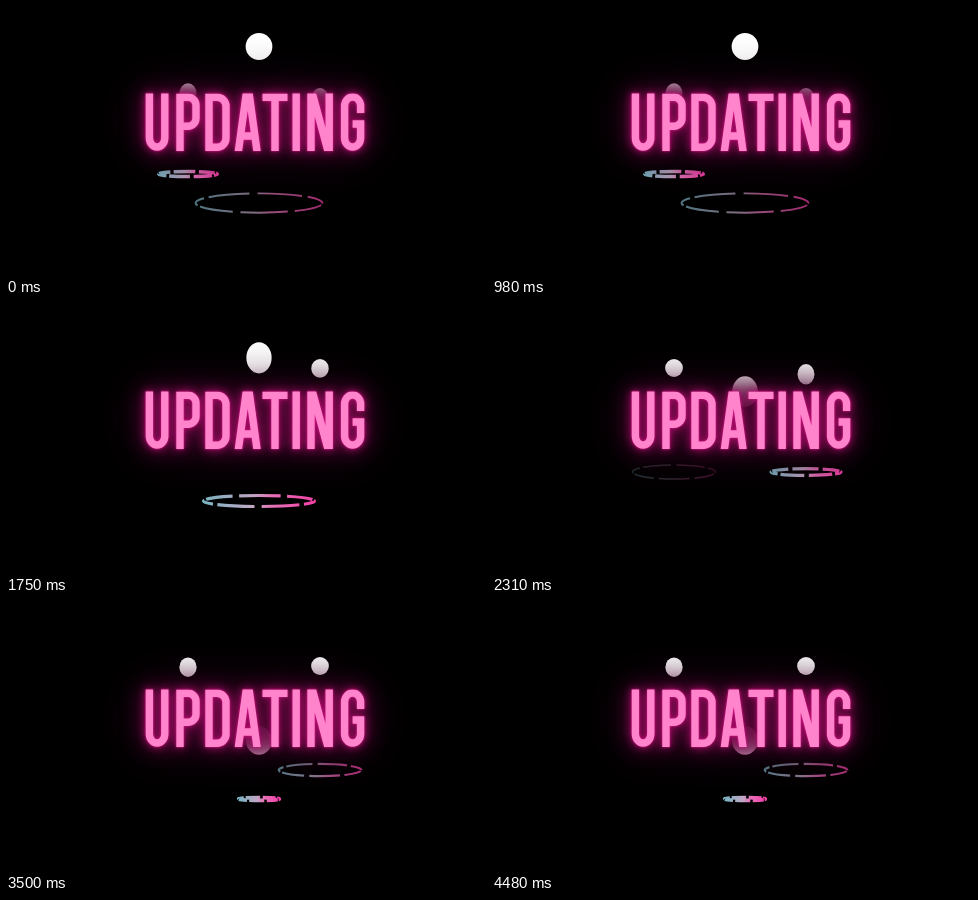
These frames come from a looping animation (480x270 px, 4.55 s). An HTML page with a canvas:

```html
<!DOCTYPE html>
<html lang="en">
<head>
<meta charset="utf-8">
<title>Updating</title>
<style>
  html, body { margin: 0; width: 100%; height: 100%; overflow: hidden; background: #000; }
  svg, canvas { position: absolute; left: 0; top: 0; width: 480px; height: 270px; }
  .glow {
    filter: drop-shadow(0 0 1px #e0148c) drop-shadow(0 0 4px #a80c68)
      drop-shadow(0 0 10px #5c0639) drop-shadow(0 0 22px #26031a);
  }
  .letters { fill: none; stroke: #ff84cc; stroke-width: 7.4; clip-path: url(#line); }
</style>
</head>
<body>
<canvas id="stage" width="480" height="270"></canvas>
<svg viewBox="0 0 480 270" role="img" aria-label="UPDATING">
  <clipPath id="line"><path d="M130 87.5H370V145H130z"/></clipPath>
  <g class="glow"><g class="letters">
    <path d="M143.4 87V132a7.7 9 0 0 0 15.4 0V87"/>
    <path d="M174 146V91.2h8a8 8 0 0 1 8 8v13a8 8 0 0 1-8 8h-8"/>
    <path d="M203 91.2V141.3h8a9 9 0 0 0 9-9V100.2a9 9 0 0 0-9-9z"/>
    <path d="M232 148L240.8 84M251.4 148L242.6 84M236 130h12"/>
    <path d="M256.5 91.2h25M269 91V146"/>
    <path d="M290.2 87V146"/>
    <path d="M305 146V87M323.2 146V87M305.4 84L322.8 148"/>
    <path d="M354.6 107V100a8 9 0 0 0-16 0V132a8 9 0 0 0 16 0V118h-8"/>
  </g></g>
</svg>
<script>
const LOOP = 4550, STEP = 70, BOUNCE = 980, RIPPLE = 560;
const ctx = document.getElementById('stage').getContext('2d');

// land: when the ball touches the floor; rise, fall: steepness of each half
const small = { r: 8.9, top: 64, drop: 96, rise: 3.8, fall: 5.5, floor: 168, ringW: 42.5, ringH: 7.3 };
const balls = [
  { ...small, x: 182, land: 828, ripple: 790 },
  { ...small, x: 314, land: 98, ripple: 90 },
  { x: 253, r: 13.4, top: 40.5, drop: 143, rise: 3, fall: 3, floor: 197, ringW: 64.5, ringH: 11,
    land: 502, ripple: 490 }
];

const since = (t, start) => (t - start + BOUNCE) % BOUNCE;

function heightAt(b, t) {
  const u = since(t, b.land) / BOUNCE * 2 - 1;
  return b.top + b.drop * Math.abs(u) ** (u < 0 ? b.rise : b.fall);
}

function gradient(x0, y0, x1, y1, stops) {
  const g = ctx.createLinearGradient(x0, y0, x1, y1);
  stops.forEach(([at, colour]) => g.addColorStop(at, colour));
  return g;
}

// Balls take on the glow of the sign as they pass behind it
const ballFill = gradient(0, 60, 0, 160, [
  [0, '#fff'], [.2, '#ffeaf7'], [.3, '#f5b4de'], [.45, '#d874b4'],
  [.65, '#d874b4'], [.8, '#f9a4d6'], [.95, '#ffc8e8']
]);

function drawRing(b, t) {
  const age = since(t, b.ripple);
  if (age >= RIPPLE) return;
  const u = age / RIPPLE;
  const rx = Math.max(1, b.ringW * (1 - (1 - u) ** 3) - 1);
  const ry = Math.max(.4, b.ringH * u);
  const dash = Math.PI * 2 / 7, gap = .13;
  const turn = .23 + .92 * u;
  ctx.globalAlpha = 1 - u ** 8;
  ctx.lineWidth = 3.8 - 2.4 * u * u;
  ctx.strokeStyle = gradient(b.x - rx, 0, b.x + rx, 0,
    [[0, '#7cb6c6'], [.45, '#c3a9c6'], [.62, '#e874bb'], [1, '#f443aa']]);
  for (let i = 0; i < 7; i++) {
    const from = turn + i * dash;
    ctx.beginPath();
    ctx.ellipse(b.x, b.floor, rx, ry, 0, from + gap / 2, from + dash - gap / 2);
    ctx.stroke();
  }
  ctx.globalAlpha = 1;
}

function drawBall(b, t) {
  const y = heightAt(b, t);
  const speed = Math.abs(heightAt(b, t + 2) - heightAt(b, t - 2)) / 4;
  const height = 1 - (y - b.top) / b.drop;
  const stretch = .22 * height * speed / (speed + .04);
  ctx.fillStyle = ballFill;
  ctx.beginPath();
  ctx.ellipse(b.x, y, b.r * (1 - stretch * .35), b.r * (1 + stretch), 0, 0, Math.PI * 2);
  ctx.fill();
}

function draw() {
  const t = Math.floor(performance.now() % LOOP / STEP) * STEP % BOUNCE;
  ctx.clearRect(0, 0, 480, 270);
  balls.forEach(b => drawRing(b, t));
  balls.forEach(b => drawBall(b, t));
  requestAnimationFrame(draw);
}
draw();
</script>
</body>
</html>
```
